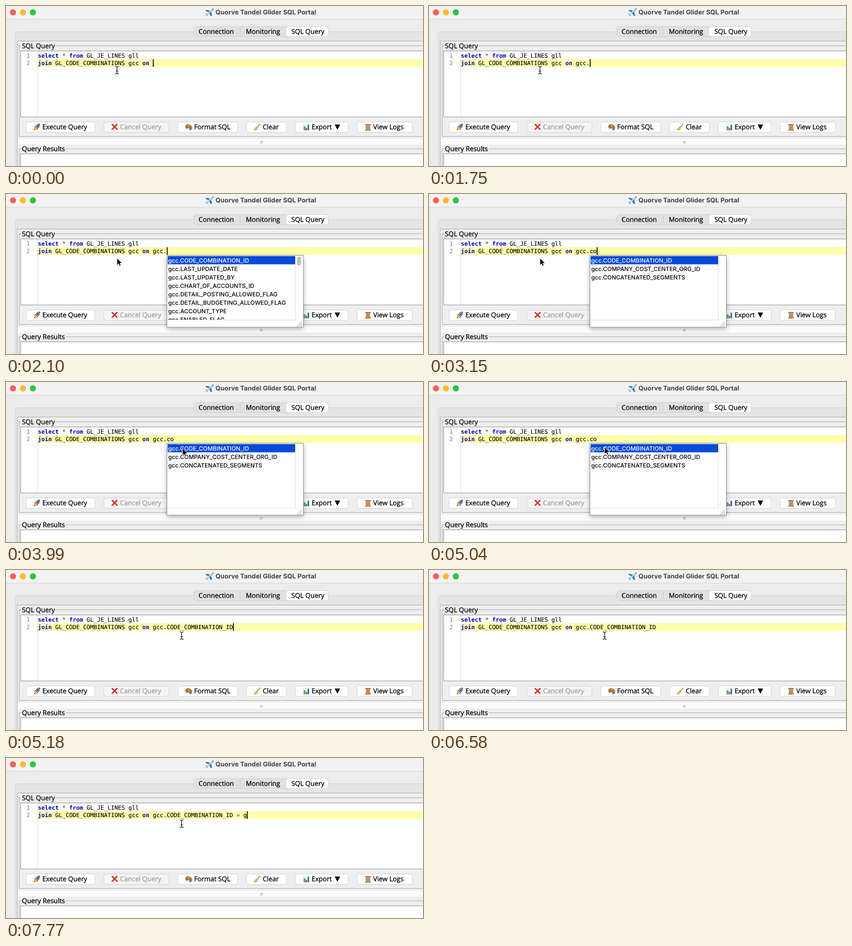
Write an HTML page that moves like this. It is 838 px wide and 322 px high and loops after 8000 ms.

```html
<!DOCTYPE html>
<html lang="en">
<head>
<meta charset="utf-8">
<title>SQL editor completion</title>
<style>
  html, body { margin: 0; width: 100%; height: 100%; overflow: hidden; background: #ececec; }
  svg { display: block; width: 838px; height: 322px; }
  text { white-space: pre; text-rendering: geometricPrecision; }
  .ui { font: 13.35px "Open Sans", "Noto Sans", sans-serif; fill: #000; stroke: #000; stroke-width: .32px; }
  .off { fill: #9d9d9d; stroke: #9d9d9d; }
  .title { font: 700 12.9px Inter, sans-serif; fill: #444; }
  .code { font: 11.63px "DejaVu Sans Mono", monospace; fill: #000; stroke: #000; stroke-width: .12px; }
  .num { fill: #7c7c7c; stroke: none; text-anchor: end; }
  .key { font-weight: 700; fill: #0000c0; stroke: none; }
  .op { fill: #804040; stroke: #804040; }
  .item { font: 500 11.65px Inter, sans-serif; fill: #000; }
  .chosen { fill: #fff; }
  .line { fill: none; stroke: #a8a8a8; }
  .button { fill: #fff; stroke: #d3d3d3; }
  #popup { filter: drop-shadow(0 3px 5px rgba(0, 0, 0, .3)); }
</style>
</head>
<body>
<svg viewBox="0 0 838 322">
  <defs>
    <clipPath id="rows"><rect x="324" y="124" width="257" height="129"/></clipPath>
    <path id="ibeam" d="M-3.5-7.5Q0-7.5 0-5 0-7.5 3.5-7.5M0-5V5M-3.5 7.5Q0 7.5 0 5 0 7.5 3.5 7.5M-2 2H2"/>
  </defs>

  <!-- window -->
  <rect width="838" height="322" fill="#ececec"/>
  <rect width="838" height="26" fill="#f3f2f3"/>
  <path d="M0 26.5H838" stroke="#d6d5d6"/>
  <circle cx="14" cy="12.8" r="6.2" fill="#ff5f57"/>
  <circle cx="34" cy="12.8" r="6.2" fill="#febc2e"/>
  <circle cx="54" cy="12.8" r="6.2" fill="#28c840"/>
  <g transform="translate(400 4)">
    <path d="M1 5L4 4 10 6 13 3Q16 0 17 1T15 5L12 8 14 15 12 16 8 10 5 13V15L4 16 3 14 1 13 2 12H4L7 9Z" fill="#9fb9cc" stroke="#5685a8" stroke-width=".7"/>
    <path d="M1 5L4 4 10 6 7 8ZM12 8L14 15 12 16 8 10Z" fill="#2d7fbd"/>
    <path d="M4 13L14 3" stroke="#eef5fa" stroke-width="1.2"/>
  </g>
  <text class="title" x="421" y="17">Quorve Tandel Glider SQL Portal</text>

  <!-- tabs -->
  <path d="M838 51.5H24Q18.5 51.5 18.5 57V322H838Z" fill="#e5e5e5" stroke="#d6d6d6"/>
  <rect x="377.5" y="41.5" width="270" height="20" rx="5" fill="#e1e1e1" stroke="#cfcfcf"/>
  <path d="M470.5 45V58" stroke="#c4c4c4"/>
  <rect class="button" x="562.5" y="41.5" width="85" height="20" rx="5"/>
  <g class="ui">
    <text x="387" y="56">Connection</text>
    <text x="482" y="56">Monitoring</text>
    <text x="573.5" y="56">SQL Query</text>
  </g>

  <!-- panels -->
  <rect x="22" y="70" width="816" height="252" fill="#eee"/>
  <path class="line" d="M838 70.5H22.5V322"/>
  <path class="line" d="M31 80H26.5V262.5H838M99 80H838"/>
  <rect x="23" y="267" width="815" height="12" fill="#fbfbfb"/>
  <circle cx="513" cy="274.3" r="3" fill="#d2d2d2"/>
  <path class="line" d="M31 287.5H26.5V322M120 287.5H838"/>
  <rect x="29.5" y="297.5" width="820" height="40" fill="#fff" stroke="#8e8e8e"/>
  <text class="ui" x="32" y="85">SQL Query</text>
  <text class="ui" x="32" y="292">Query Results</text>

  <!-- editor -->
  <rect x="29.5" y="90.5" width="820" height="132.7" fill="#fff" stroke="#8e8e8e"/>
  <rect x="64" y="107" width="774" height="15.5" fill="#ffffaa"/>
  <path d="M63.5 91V222" stroke="#ddd"/>
  <text class="code num" x="48" y="104">1</text>
  <text class="code num" x="48" y="119">2</text>
  <text class="code" id="line1" x="64" y="104"></text>
  <text class="code" id="line2" x="64" y="119"></text>
  <rect id="caret" y="107" width="1.7" height="15.5"/>

  <!-- buttons -->
  <g id="buttons"></g>
  <g transform="translate(55 237)">
    <path d="M13 0Q7 0 4 6L8 10Q13 7 13 0Z" fill="#7d8790" stroke="#4a545d" stroke-width=".8"/>
    <path d="M5 5L1 7 3 8ZM9 9L7 13 6 11Z" fill="#b52c26"/>
    <circle cx="9.3" cy="4.3" r="1.6" fill="#276ea5"/>
    <path d="M4 8Q1 9 0 13.5 5 13 6 10Z" fill="#f08a1c"/>
  </g>
  <path d="M213.5 238.5L223 248M223 238.5L213.5 248" stroke="#e02a20" stroke-width="2.7" stroke-linecap="round"/>
  <g transform="translate(360 237)">
    <path d="M1 7C0 2 5 0 9 2 14 4 15 9 12 12 10 14 8 12 9 10 9 8 7 9 5 9 2 10 1 9 1 7Z" fill="#b9773f" stroke="#7d4c25" stroke-width=".7"/>
    <circle cx="4" cy="5" r="1.2" fill="#e34235"/>
    <circle cx="7" cy="4" r="1.2" fill="#f5ce35"/>
    <circle cx="10.3" cy="5.8" r="1.2" fill="#4aa84d"/>
    <circle cx="11.3" cy="9" r="1.2" fill="#3685d1"/>
  </g>
  <g transform="translate(498 237)">
    <path d="M13 0L6 8" stroke="#966336" stroke-width="1.3"/>
    <path d="M5 6L8 9Q6 13 2 13L0 11Q3 10 5 6Z" fill="#e5bd55" stroke="#a87c2c" stroke-width=".6"/>
  </g>
  <g transform="translate(597 237)">
    <rect x=".5" y=".5" width="12" height="13" fill="#f6f8fa" stroke="#cbd5dd" stroke-width=".7"/>
    <rect x="1.5" y="5" width="3" height="8" fill="#3da553"/>
    <rect x="5.2" y="8" width="3" height="5" fill="#d9473a"/>
    <rect x="9" y="2" width="3" height="11" fill="#2878c7"/>
  </g>
  <path d="M660.5 238.5H671.5L666 249Z"/>
  <g transform="translate(721 237)">
    <path d="M2 2H11V12H2Z" fill="#c79c70"/>
    <path d="M3 5H10M3 7.5H10M3 10H10" stroke="#a3784f" stroke-width=".8"/>
    <path d="M1.5 1.5H11.5M1.5 12.5H11.5" stroke="#a0714a" stroke-width="2.2" stroke-linecap="round"/>
  </g>

  <!-- completion list -->
  <g id="popup">
    <rect x="323.5" y="123.5" width="274" height="144.5" fill="#fff" stroke="#8e8e8e"/>
    <path d="M581.5 124V253.5H324" fill="none" stroke="#dcdcdc"/>
    <rect x="325" y="125" width="256" height="16.5" fill="#084ad9"/>
    <g id="items" clip-path="url(#rows)"></g>
    <rect id="thumb" x="585" y="126" width="8" height="18" rx="4" fill="#c1c1c1"/>
    <path d="M585 267L595 257M589 267L595 261M593 267L595 265" stroke="#8e8e8e"/>
  </g>

  <!-- pointers -->
  <g id="beam" fill="none" stroke-linecap="round">
    <use href="#ibeam" stroke="#fff" stroke-width="2.6"/>
    <use href="#ibeam" stroke="#000" stroke-width="1.2"/>
  </g>
  <path id="arrow" d="M0 0V14.5L3.3 11.4 5.4 16.2 8 15.1 5.9 10.5H10.3Z" fill="#000" stroke="#fff"/>
</svg>
<script>
const LOOP = 8000, STEP = 70, CELL = 7, LEFT = 64;
const OPEN = 2100, CLOSE = 5180;
const $ = id => document.getElementById(id);

const START = "join GL_CODE_COMBINATIONS gcc on ";
const TYPED = START + "gcc.co";
const DONE = START + "gcc.CODE_COMBINATION_ID = g";

// time, characters on the line, caret visible
const CARET = [
  [0, 33, 1], [210, 33, 0], [490, 34, 1], [770, 35, 1], [980, 36, 1], [1540, 36, 0],
  [1750, 37, 1], [2310, 37, 0], [2660, 38, 1], [3150, 39, 1], [3710, 39, 0],
  [4200, 39, 1], [4690, 39, 0], [CLOSE, 56, 1], [5740, 56, 0], [6090, 57, 1],
  [6580, 57, 0], [6720, 58, 1], [7280, 59, 1], [7770, 60, 1]
];

// time, x, y
const POINTER = [
  [0, 223, 129], [3780, 223, 129], [4130, 426, 136], [4410, 353, 127],
  [4480, 351, 125], [4690, 351, 125], [CLOSE, 353, 132], [LOOP, 353, 132]
];

const LISTS = [
  [OPEN, "CODE_COMBINATION_ID LAST_UPDATE_DATE LAST_UPDATED_BY CHART_OF_ACCOUNTS_ID " +
    "DETAIL_POSTING_ALLOWED_FLAG DETAIL_BUDGETING_ALLOWED_FLAG ACCOUNT_TYPE ENABLED_FLAG"],
  [2660, "CODE_COMBINATION_ID CHART_OF_ACCOUNTS_ID COMPANY_COST_CENTER_ORG_ID " +
    "CONCATENATED_SEGMENTS CREATION_DATE CREATED_BY CLEARING_FLAG"],
  [3150, "CODE_COMBINATION_ID COMPANY_COST_CENTER_ORG_ID CONCATENATED_SEGMENTS"]
];

// x, width, label x, label, disabled
const BUTTONS = [
  [40.5, 138, 73, "Execute Query"], [196.5, 131, 229, "Cancel Query", true],
  [345.5, 120, 378, "Format SQL"], [483.5, 80, 516, "Clear"],
  [581.5, 106, 614, "Export"], [705.5, 111, 738, "View Logs"]
];

$("buttons").innerHTML = BUTTONS.map(([x, w, tx, label, off]) =>
  `<rect class="button" x="${x}" y="233.5" width="${w}" height="21" rx="5"${off ? ' style="fill:#f4f4f4"' : ""}/>
   <text class="ui${off ? " off" : ""}" x="${tx}" y="248">${label}</text>`).join("");

const paint = code => code
  .replace(/[*=]/g, m => `<tspan class='op'>${m}</tspan>`)
  .replace(/\b(select|from|join|on)\b/g, "<tspan class='key'>$1</tspan>");

const latest = (table, t) => table.reduce((hit, row) => row[0] <= t ? row : hit, table[0]);
const show = (id, on) => { $(id).style.display = on ? "" : "none"; };

function pointerAt(t) {
  const i = POINTER.findIndex(p => p[0] > t);
  const [a, b] = [POINTER[i - 1], POINTER[i]];
  const k = (t - a[0]) / (b[0] - a[0]);
  const e = k * k * (3 - 2 * k);
  return [a[1] + (b[1] - a[1]) * e, a[2] + (b[2] - a[2]) * e];
}

function setList(names) {
  $("items").innerHTML = names.split(" ").map((name, i) =>
    `<text class="item${i ? "" : " chosen"}" x="326" y="${138 + 17 * i}">gcc.${name}</text>`).join("");
}

function draw(t) {
  const [, count, on] = latest(CARET, t);
  $("line2").innerHTML = paint((t < CLOSE ? TYPED : DONE).slice(0, count));
  $("caret").setAttribute("x", LEFT + CELL * count);
  show("caret", on);

  const open = t >= OPEN && t < CLOSE;
  show("popup", open);
  if (open) {
    const list = latest(LISTS, t);
    setList(list[1]);
    show("thumb", list === LISTS[0]);
  }

  const place = `translate(${pointerAt(t)})`;
  for (const id of ["beam", "arrow"]) $(id).setAttribute("transform", place);
  show("beam", !open);
  show("arrow", open);
}

$("line1").innerHTML = paint("select * from GL_JE_LINES gll");
const begin = performance.now();
let last = -1;
function tick() {
  const now = Math.max(0, performance.now() - begin) % LOOP;
  const t = Math.floor(now / STEP) * STEP;
  if (t !== last) draw(last = t);
  requestAnimationFrame(tick);
}
tick();
</script>
</body>
</html>
```
